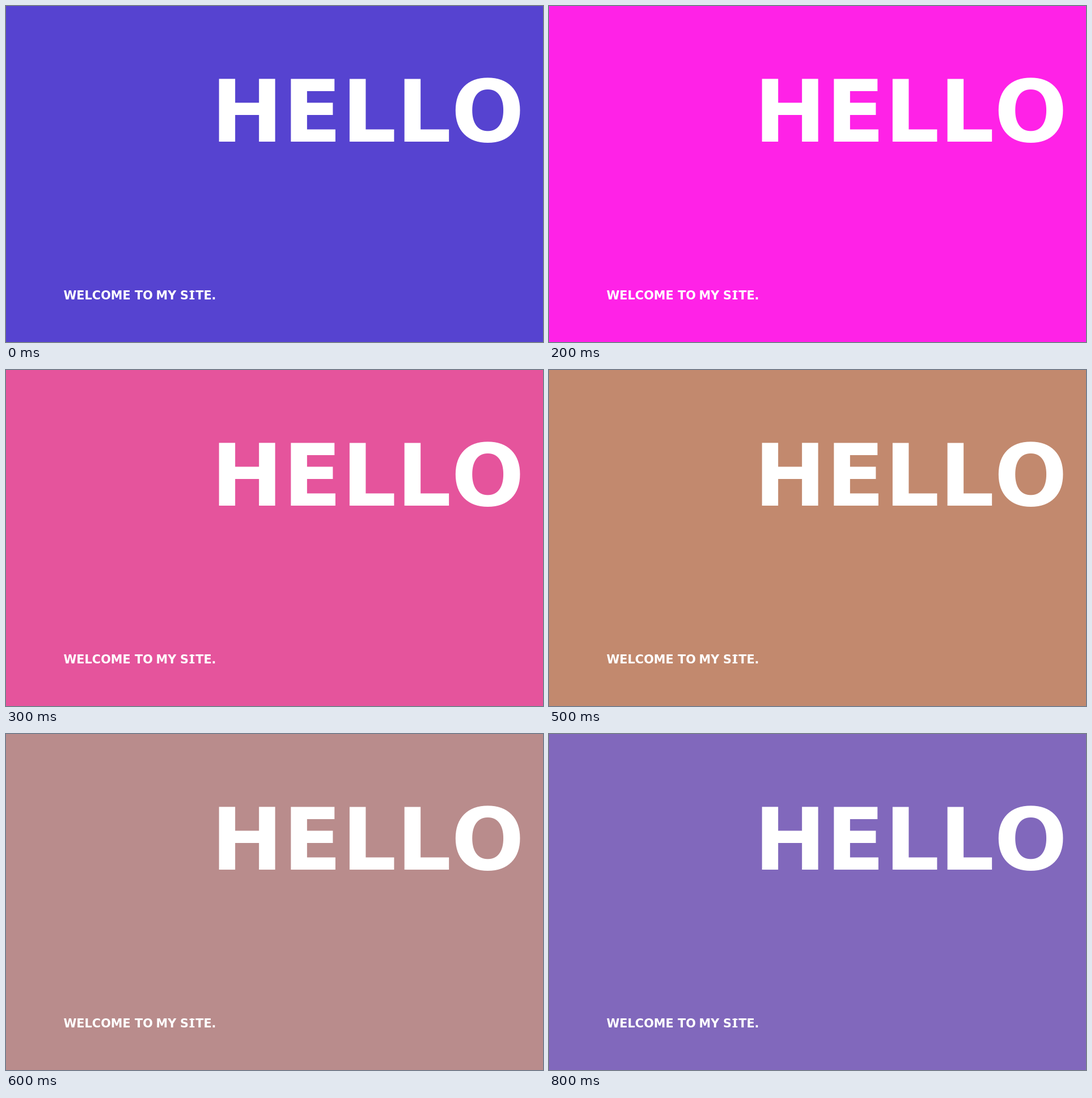
Write an HTML page that moves like this. It is 947x592 px and loops after 900 ms.

```html
<!DOCTYPE html>
<html lang="en">
<head>
<meta charset="utf-8">
<title>Hello</title>
<style>
  html, body { margin: 0; width: 100%; height: 100%; overflow: hidden; background: #5643d0; }
  svg { display: block; width: 100%; height: 100%; }
  text { font-family: Verdana, "DejaVu Sans", sans-serif; font-weight: bold; font-kerning: none; }
  .greeting { font-size: 151.52px; }
  .welcome { font-size: 20.83px; }
</style>
</head>
<body>
<svg viewBox="0 0 947 592" fill="#fff">
  <text class="greeting" x="361.8" y="238.7">HELLO</text>
  <text class="welcome" y="517"><tspan x="101.4">WELCOME </tspan><tspan x="227">TO </tspan><tspan x="264.6">MY </tspan><tspan x="306.9">S</tspan><tspan x="324.1">I</tspan><tspan x="334.2">TE.</tspan></text>
  <!-- serifs of the capital I -->
  <path d="M323.6 501.8h8.8v2.3h-8.8zM323.6 514.7h8.8v2.3h-8.8z"/>
</svg>
<script>
  const STEP = 100;
  const colors = [
    '#5643d0', '#6bcd2b', '#ff22e7', '#e5549c', '#ca8550',
    '#c2896e', '#b98c8c', '#9d7aa4', '#8168bc'
  ];

  function draw() {
    const step = Math.floor(performance.now() / STEP) % colors.length;
    document.body.style.background = colors[step];
    requestAnimationFrame(draw);
  }
  draw();
</script>
</body>
</html>
```
